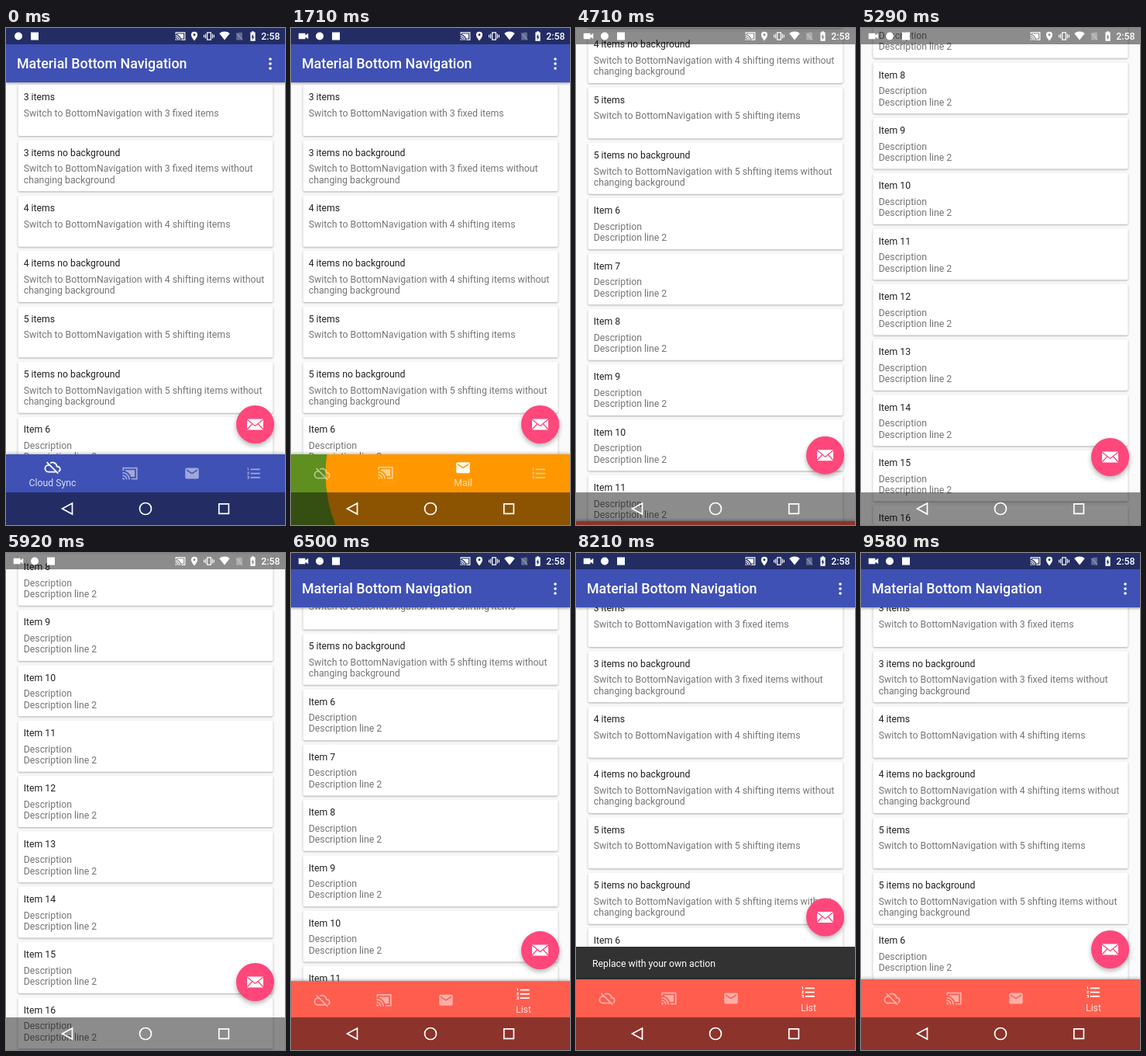
Write an HTML page with a canvas that moves like this. It is 360x640 px and loops after 9620 ms.

```html
<!DOCTYPE html>
<html lang="en">
<head>
<meta charset="utf-8">
<title>Material Bottom Navigation</title>
<style>
html, body { margin: 0; width: 100%; height: 100%; overflow: hidden; background: #fafafa; }
canvas { display: block; width: 360px; height: 640px; }
</style>
</head>
<body>
<canvas id="stage"></canvas>
<script>
const W = 360, H = 640, LOOP = 9620;
const APP_BAR = 70, STATUS = 21, NAV_TOP = 549, SYS_TOP = 598, ROW = 71.33;
const FONT = 'Roboto, sans-serif';
const SHADE = 'rgba(0,0,0,.45)';
const PAGE = '#fafafa', WHITE = '#fff', ACCENT = '#ff477c';

const canvas = document.getElementById('stage');
const g = canvas.getContext('2d');
const dpr = window.devicePixelRatio || 1;
canvas.width = W * dpr;
canvas.height = H * dpr;

// Icons on a 24-unit grid: s = stroked outline, f = filled shape
const ICONS = {
  cloudOff: { s: 'M8.7 5.9C13 3.5 18.2 6.5 18.5 11c5.5 0 6 6 2.3 7.5M17 19H6c-6.6 0-6.6-10 0-10h1.5M3.6 4.6l16.8 16.8' },
  cast: {
    s: 'M2 8V4h20v16h-8M1 11a10 10 0 0 1 10 10M1 15a6 6 0 0 1 6 6',
    f: 'M1 18v3h3a3 3 0 0 0-3-3zM5 7h14v10h-5.6A13 13 0 0 0 5 8.6z'
  },
  mail: { f: 'M4 4h16a2 2 0 0 1 2 2v12a2 2 0 0 1-2 2H4a2 2 0 0 1-2-2V6a2 2 0 0 1 2-2zM4 6v2l8 5 8-5V6l-8 5z' },
  list: {
    s: 'M7 6h14M7 12h14M7 18h14',
    f: 'M2 4h2v4H3V5H2zM2 10h3v1l-1.8 2H5v1H2v-1l1.8-2H2zM2 16h3v4H2v-1h2v-.5H3v-1h1V17H2z'
  },
  pin: { f: 'M12 2a7 7 0 0 0-7 7c0 5.2 7 13 7 13s7-7.8 7-13a7 7 0 0 0-7-7zM12 11.5a2.5 2.5 0 1 1 0-5a2.5 2.5 0 0 1 0 5z' },
  vibrate: { s: 'M8 4h8v16H8zM4.5 7v10M19.5 7v10M1 9v6M23 9v6' },
  wifi: { f: 'M12 21.5L.4 7a18 18 0 0 1 23.2 0z' },
  noSim: { s: 'M4 4l16 17', f: 'M10 3h9v18H5V8z' },
  battery: { f: 'M10 2h4v2h3v18H7V4h3zM11 20v-5.5H9l4-7V13h2z' },
  video: { f: 'M2 6h14v4.5l6-4.5v12l-6-4.5V18H2z' }
};
for (const icon of Object.values(ICONS)) {
  for (const k of Object.keys(icon)) icon[k] = new Path2D(icon[k]);
}

const TABS = [
  { icon: 'cloudOff', label: 'Cloud Sync', color: '#3f51b5' },
  { icon: 'cast', label: 'Cast', color: '#5f8f1e' },
  { icon: 'mail', label: 'Mail', color: '#ff9800' },
  { icon: 'list', label: 'List', color: '#ff5d4e' }
];
const TAPS = [-1000, 700, 1472, 2240];
const TAP_MS = 350;

const SWITCH = 'Switch to BottomNavigation with ';
const rows = [];
for (const [n, a, b] of [[3, 'fixed', 'fixed'], [4, 'shifting', 'shifting'], [5, 'shifting', 'shfting']]) {
  rows.push([n + ' items', `${SWITCH}${n} ${a} items`]);
  rows.push([n + ' items no background', `${SWITCH}${n} ${b} items without`, 'changing background']);
}
for (let i = 6; i <= 24; i++) rows.push(['Item ' + i, 'Description', 'Description line 2']);

const clamp = x => Math.max(0, Math.min(1, x));
const decel = x => 1 - (1 - x) ** 2;
const inOut = x => (1 - Math.cos(Math.PI * x)) / 2;
const drag = x => x ** 1.4;
const fling = x => 1 - (1 - x) ** 3;
const span = (t, from, ms, ease = decel) => ease(clamp((t - from) / ms));
const lerp = (a, b, p) => a + (b - a) * p;

// [start, end, from, to, easing]: each drag passes its speed on to a fling
const BOTTOM = 642;
const SCROLL_UP = 6060;
const SCROLL = [
  [4300, 4710, 0, 281, drag],
  [4710, 5850, 281, BOTTOM, fling],
  [SCROLL_UP, 6460, BOTTOM, 363, drag],
  [6460, 7560, 363, 18, fling]
];

function scrollAt(t) {
  let y = 0;
  for (const [a, b, from, to, ease] of SCROLL) {
    if (t >= a) y = lerp(from, to, span(t, a, b - a, ease));
  }
  return y;
}

function rect(x, y, w, h, color) {
  g.fillStyle = color;
  g.fillRect(x, y, w, h);
}

function disc(x, y, r, color) {
  g.fillStyle = color;
  g.beginPath();
  g.arc(x, y, r, 0, 7);
  g.fill();
}

function text(str, x, y, color, weight = 400, size = 12.25, align = 'left') {
  g.font = `${weight} ${size}px ${FONT}`;
  g.textAlign = align;
  g.fillStyle = color;
  g.fillText(str, x, y);
}

function shadow(alpha, blur, dy, draw) {
  g.save();
  g.shadowColor = `rgba(0,0,0,${alpha})`;
  g.shadowBlur = blur * dpr;
  g.shadowOffsetY = dy * dpr;
  draw();
  g.restore();
}

function icon(name, x, y, size, alpha = 1) {
  const { s, f } = ICONS[name];
  g.save();
  g.translate(x - size / 2, y - size / 2);
  g.scale(size / 24, size / 24);
  g.globalAlpha = alpha;
  g.fillStyle = g.strokeStyle = WHITE;
  g.lineWidth = 2;
  if (f) g.fill(f, 'evenodd');
  if (s) g.stroke(s);
  g.restore();
}

function drawList(scroll) {
  rows.forEach(([title, ...lines], i) => {
    const y = 73 + i * ROW - scroll;
    if (y > H || y < -ROW) return;
    shadow(0.32, 2.5, 1, () => {
      g.fillStyle = WHITE;
      g.beginPath();
      g.roundRect(15.5, y, 329, 66, 2);
      g.fill();
    });
    text(title, 22.7, y + 20.4, '#212121');
    lines.forEach((line, n) => text(line, 22.7, y + 41 + n * 14.35, '#757575', 400, 12.3));
  });
}

function drawAppBar(y) {
  if (y <= -APP_BAR) return;
  shadow(0.35, 3, 1.5, () => rect(0, y, W, APP_BAR, TABS[0].color));
  text('Material Bottom Navigation', 14, y + 52, WHITE, 500, 17.85);
  for (const dy of [40, 46, 52]) disc(341, y + dy, 1.8, WHITE);
}

function drawStatus(t) {
  rect(0, 0, W, STATUS, SHADE);
  let x = 16;
  if (t >= 300) {
    icon('video', x, 10.5, 15);
    x += 21;
  }
  disc(x, 10.5, 5, WHITE);
  rect(x + 16, 5.5, 10, 10, WHITE);
  icon('cast', 225, 10.5, 14);
  icon('pin', 243, 10.5, 14);
  icon('vibrate', 262, 10.5, 14);
  icon('wifi', 282, 10, 14);
  icon('noSim', 301, 10.5, 13, 0.3);
  icon('battery', 318.5, 10.5, 15);
  text('2:58', 353.5, 15, WHITE, 500, 12.25, 'right');
}

function drawSnackbar(p) {
  if (!p) return;
  const y = NAV_TOP - 42 * p;
  rect(0, y, W, 42, '#323232');
  text('Replace with your own action', 21, y + 26, WHITE);
}

function drawNav(t, dy) {
  let cur = 0;
  TAPS.forEach((at, i) => { if (t >= at) cur = i; });
  const prev = Math.max(0, cur - 1);
  const p = span(t, TAPS[cur], TAP_MS);
  const grow = span(t, TAPS[cur], TAP_MS, inOut);

  // The active tab is 120 wide, the others 80
  const weights = TABS.map((_, i) => i === cur ? p : i === prev ? 1 - p : 0);
  let left = 0;
  const centers = weights.map(w => {
    const width = 80 + 40 * w;
    left += width;
    return left - width / 2;
  });

  g.save();
  g.translate(0, dy);
  const base = TABS[grow < 1 ? prev : cur].color;
  shadow(0.3, 4, -1, () => rect(0, NAV_TOP, W, H - NAV_TOP, base));
  if (grow < 1) {
    const cx = centers[cur];
    g.save();
    g.beginPath();
    g.rect(0, NAV_TOP, W, H - NAV_TOP);
    g.clip();
    disc(cx, 574, Math.hypot(Math.max(cx, W - cx), 60) * grow, TABS[cur].color);
    g.restore();
  }
  TABS.forEach((tab, i) => {
    const w = weights[i];
    icon(tab.icon, centers[i], 573.5 - 8 * w, 21, 0.5 + 0.5 * w);
    if (w > 0) {
      g.globalAlpha = 0.8 * w;
      text(tab.label, centers[i], 589.5, WHITE, 400, 12.25, 'center');
      g.globalAlpha = 1;
    }
  });
  g.restore();
}

function drawFab(y) {
  const x = 321.5;
  shadow(0.3, 6, 3, () => disc(x, y, 24.5, ACCENT));
  rect(x - 10.5, y - 7, 21, 14, WHITE);
  g.strokeStyle = ACCENT;
  g.lineWidth = 1.3;
  g.beginPath();
  g.moveTo(x - 10.5, y - 6.5);
  g.lineTo(x, y + 2);
  g.lineTo(x + 10.5, y - 6.5);
  for (const side of [-1, 1]) {
    g.moveTo(x + side * 10.5, y + 6.5);
    g.lineTo(x + side * 4, y - 0.5);
  }
  g.stroke();
}

function drawSystemNav() {
  rect(0, SYS_TOP, W, H - SYS_TOP, SHADE);
  g.strokeStyle = WHITE;
  g.lineWidth = 1.7;
  g.beginPath();
  g.moveTo(85.5, 612);
  g.lineTo(72.5, 619);
  g.lineTo(85.5, 626);
  g.closePath();
  g.moveTo(187.5, 619);
  g.arc(180, 619, 7.5, 0, Math.PI * 2);
  g.rect(274.8, 612.8, 12.6, 12.6);
  g.stroke();
}

function draw(t) {
  const scroll = scrollAt(t);
  const barY = t < SCROLL_UP
    ? -Math.min(scroll, APP_BAR)
    : -Math.max(0, APP_BAR - (BOTTOM - scroll));
  const hidden = span(t, 4404, 400) - span(t, SCROLL_UP + 104, 400);
  const snack = span(t, 7500, 250) - span(t, 9250, 250);

  g.setTransform(dpr, 0, 0, dpr, 0, 0);
  rect(0, 0, W, H, PAGE);
  drawList(scroll);
  drawAppBar(barY);
  drawSnackbar(snack);
  if (hidden < 1) drawNav(t, 91 * hidden);
  drawFab(510.5 + 42 * hidden - 41.5 * snack);
  drawStatus(t);
  drawSystemNav();
}

const start = performance.now();
function tick() {
  draw((performance.now() - start) % LOOP);
  requestAnimationFrame(tick);
}
tick();
</script>
</body>
</html>
```
